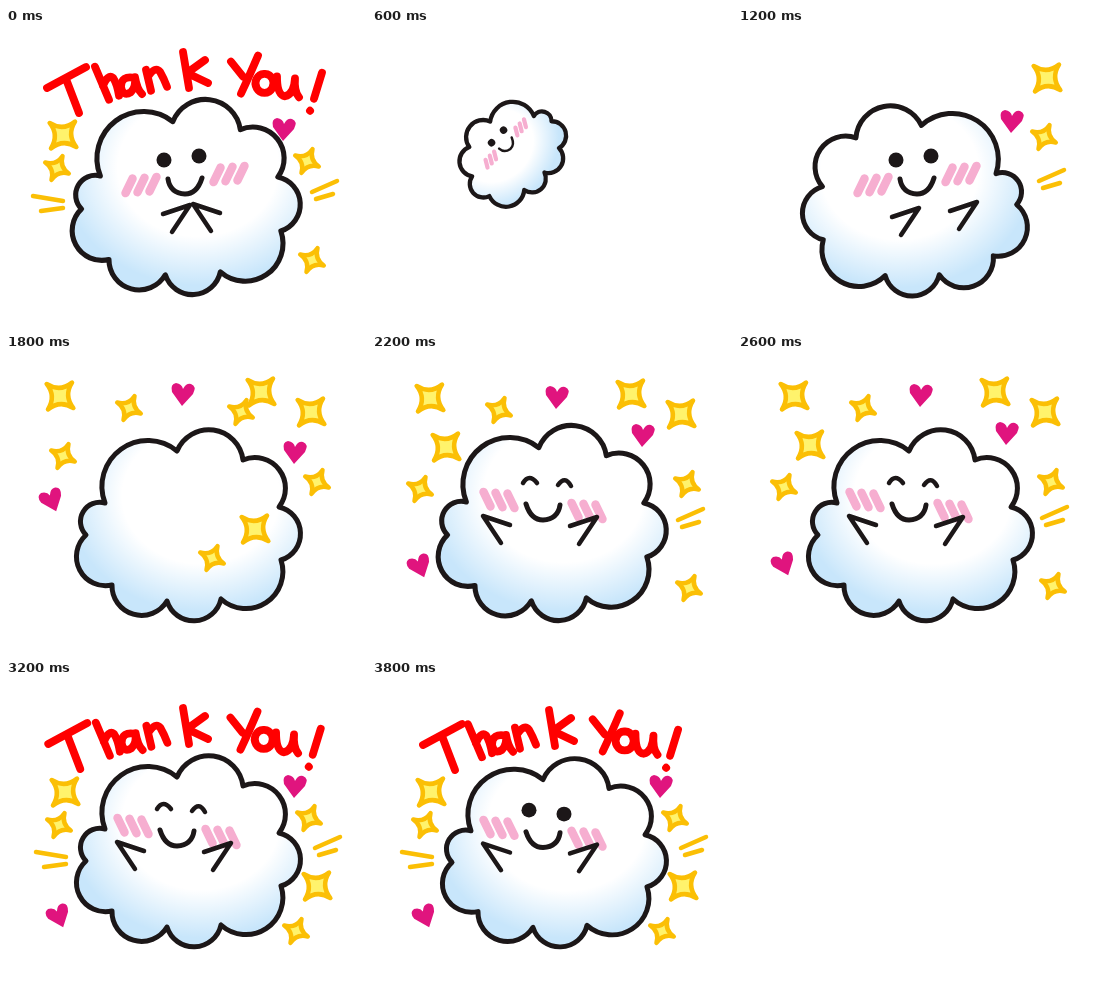
Recreate the animation shown at these times as an HTML page with a canvas. Size 360 by 298 pixels, loop 4 s.

```html
<!DOCTYPE html>
<html lang="en">
<head>
<meta charset="utf-8">
<title>Thank You!</title>
<style>
html, body { margin: 0; width: 100%; height: 100%; overflow: hidden; background: #fff; }
canvas { display: block; }
</style>
</head>
<body>
<canvas id="stage" width="360" height="298" role="img" aria-label="Thank You!"></canvas>
<script>
const ctx = document.getElementById('stage').getContext('2d');
const INK = '#1c1718', RED = '#ff0000', GOLD = '#fbbf05', LEMON = '#fff36c', PINK = '#e0147e', BLUSH = '#f6aed0';
const STEP = 200, STEPS = 20;
const rad = deg => deg * Math.PI / 180;

// The cloud is a ring of notches joined by bumps whose radius follows their width.
const notches = [[99, 149], [171, 97], [237, 106], [273, 153], [275, 206], [215, 245], [161, 247], [106, 231], [80, 181]];
const outline = new Path2D(notches.reduce((d, [x, y], i) => {
  const [nx, ny] = notches[(i + 1) % notches.length];
  const r = Math.hypot(nx - x, ny - y) * .517;
  return d + `A${r} ${r} 0 0 1 ${nx} ${ny}`;
}, `M${notches[0]}`) + 'Z');

const smile = new Path2D('M154 150Q159 166 171 166Q186 165 188 151');
const lids = new Path2D('M151 129Q157 119 165 129M186 131Q193 121 199 132');
const hook = new Path2D('M-14 5L13 -4L-5 23');
const heart = new Path2D('M-1 12L-11 -2Q-13 -10 -7 -11Q-1 -10 0 -5Q3 -11 8 -10Q14 -8 10 0Z');
const leftRays = new Path2D('M-15 -6L15 -1M-7 9L15 6');
const rightRays = new Path2D('M-13 6L12 -5M-9 13L8 8');

// Letters by their distance from the middle of the words
const letters = [
  [-125, 'M-20 -3L19 -24M-1 -12L12 22'],
  [-87, 'M-10 -14L4 19M-2 5Q3 -7 8 -3Q12 3 14 15'],
  [-63, 'M6 2Q-8 -1 -8 11Q-6 21 2 16Q7 11 6 1Q8 13 13 18'],
  [-37, 'M-9 -3L-4 18M-7 4Q0 -7 5 -1Q9 6 12 14'],
  [0, 'M-9 -19L-3 17M13 -11L-5 2L16 12'],
  [53, 'M-14 -13L-2 2M13 -19Q4 2 -4 19'],
  [73, 'M0 -4A9 9.5 0 1 1 -1 -4Z'],
  [94, 'M-9 -6Q-9 13 -1 14Q8 12 9 -4Q8 9 13 15'],
  [124, 'M6 -18L-2 8M-6 20l.1 .1']
].map(([x, d]) => [x, new Path2D(d)]);

function at(x, y, paint, { angle = 0, scale = 1, flip = 1 } = {}) {
  ctx.save();
  ctx.translate(x, y);
  ctx.rotate(rad(angle));
  ctx.scale(scale * flip, scale);
  paint();
  ctx.restore();
}

function line(path, color, width) {
  ctx.strokeStyle = color;
  ctx.lineWidth = width;
  ctx.stroke(path);
}

function dot(x, y, r) {
  ctx.beginPath();
  ctx.arc(x, y, r, 0, 7);
  ctx.fill();
}

function drawBody(width) {
  ctx.translate(-183.5, -175);
  ctx.save();
  ctx.clip(outline);
  ctx.fillStyle = '#c8e6fb';
  ctx.fillRect(50, 60, 270, 220);
  ctx.translate(195, 142);
  ctx.scale(1.16, 1);
  const glow = ctx.createRadialGradient(0, 0, 68, 0, 0, 116);
  glow.addColorStop(0, '#fff');
  glow.addColorStop(1, 'rgba(255,255,255,0)');
  ctx.fillStyle = glow;
  ctx.fillRect(-150, -90, 300, 240);
  ctx.restore();
  line(outline, INK, width);
}

function drawCheek(x, y) {
  at(x, y, () => {
    ctx.beginPath();
    for (const dx of [-13, -1, 11]) {
      ctx.moveTo(dx - 3, -7);
      ctx.lineTo(dx + 5, 7);
    }
    ctx.strokeStyle = BLUSH;
    ctx.lineWidth = 8.5;
    ctx.stroke();
  }, { angle: 4 });
}

// Faces mirror around x = 175 when the cloud looks the other way.
function drawFace({ happy, flip }) {
  at(175, 0, () => {
    ctx.translate(-175, 0);
    drawCheek(127, 146);
    drawCheek(215, 157);
    line(smile, INK, 5);
    if (happy) return line(lids, INK, 4.5);
    ctx.fillStyle = INK;
    dot(157, 128, 7.5);
    dot(192, 132, 7.5);
  }, { flip });
}

function drawStar([x, y, big]) {
  const r = big ? 18 : 13;
  at(x, y, () => {
    ctx.beginPath();
    ctx.moveTo(r, 0);
    for (let i = 1; i <= 4; i++) {
      const mid = rad(i * 90 - 45), end = rad(i * 90);
      ctx.quadraticCurveTo(Math.cos(mid) * r * .2, Math.sin(mid) * r * .2, Math.cos(end) * r, Math.sin(end) * r);
    }
    ctx.closePath();
    ctx.fillStyle = LEMON;
    ctx.fill();
    line2(GOLD, 4.5);
  }, { angle: big ? 42 : 25 });
}

function line2(color, width) {
  ctx.strokeStyle = color;
  ctx.lineWidth = width;
  ctx.stroke();
}

function drawHeart([x, y]) {
  at(x, y, () => {
    ctx.fillStyle = PINK;
    ctx.fill(heart);
  }, { angle: x < 100 ? -25 : 0 });
}

function drawBits({ stars, hearts, rays = [] }) {
  stars.forEach(drawStar);
  hearts.forEach(drawHeart);
  for (const [x, y] of rays) at(x, y, () => line(x < 180 ? leftRays : rightRays, GOLD, 4.5));
}

// The words sit on an arch that drops towards both ends.
function drawWords({ top, drop, spread }) {
  for (const [dx, path] of letters) {
    at(186 + dx * spread, top + drop * (dx / 125) ** 2, () => line(path, RED, 7.8));
  }
}

const move = (points, dx, dy) => points.map(([x, y, big]) => [x + dx, y + dy, big]);
const shift = ({ stars, hearts, rays = [] }, dx, dy) =>
  ({ stars: move(stars, dx, dy), hearts: move(hearts, dx, dy), rays: move(rays, dx, dy) });

const arch = [[56, 42, 1], [125, 54], [257, 38, 1], [307, 58, 1], [313, 128]];
const sides = [[59, 112, 1], [53, 145], [303, 138]];
const sideRays = [[45, 178], [322, 162]];

const bowBits = { stars: [...move(sides, -2, -5), [306, 232]], hearts: [[278, 101]], rays: move(sideRays, -3, -4) };
const flyBits = { stars: [[309, 50, 1], [306, 109]], hearts: [[274, 93]], rays: [[314, 147]] };
const swingBits = shift({ ...flyBits, stars: [...flyBits.stars, [302, 236]] }, -1, 4);
const turnBits = { stars: [...arch.slice(2), [235, 60]], hearts: [[177, 43], [289, 99]] };
const burstBits = {
  stars: [...move(arch, -2, 0), [57, 102], [235, 58], [249, 175, 1], [206, 204]],
  hearts: [[177, 40], [289, 98], [46, 146]]
};
const partyBits = {
  stars: [...arch, [72, 91, 1], [46, 133], [315, 232]],
  hearts: [[183, 41], [269, 79], [46, 210]],
  rays: [[317, 158]]
};
const thanksBits = {
  stars: [...sides, [311, 206, 1], [290, 251]],
  hearts: [[289, 106], [53, 236]],
  rays: sideRays
};

const words = {
  high: { top: 43, drop: 20, spread: 1 },
  wide: { top: 47, drop: 20, spread: .99 },
  tight: { top: 49, drop: 19, spread: .92 }
};

// Bodies: [x, y, transform]
const bodies = {
  plain: [183.5, 175, {}],
  bow: [181, 173, { scale: 1.02, angle: -1 }],
  mirrored: [175, 176, { flip: -1, angle: -3 }]
};

// Arms: one hook each, [x, y, flip]
const arms = {
  pray: [[171, 181, 1], [200, 180, -1]],
  out: [[168, 184, 1], [226, 178, 1]],
  up: [[124, 166, -1], [212, 167, 1]]
};

const looking = { flip: -1 }, smiling = { happy: true };
const flight = [[108, 86], [140, 126], [190, 172], [190, 145]].map(([x, y], i) => ({
  body: bodies.mirrored, face: looking, x, y, scale: .165 * (i + 2), angle: 10 * (i - 5)
}));
const mirrored = (bits, limbs = arms.out) => ({ body: bodies.mirrored, face: looking, arms: limbs, bits });
const cheer = (bits, text) => ({ body: bodies.plain, face: smiling, arms: arms.up, bits, text });
const happyThanks = cheer(thanksBits, words.wide);
const openThanks = { ...cheer(thanksBits, words.tight), face: {}, squash: .985 };

const scenes = [
  { body: bodies.bow, face: looking, arms: arms.pray, bits: bowBits, text: words.high },
  {},
  ...flight,
  mirrored(flyBits),
  mirrored(swingBits, move(arms.out, -6, 3).map(([x, y]) => [x, y, 1])),
  { body: bodies.plain, bits: turnBits },
  { body: bodies.plain, bits: burstBits },
  mirrored(shift(partyBits, -3, 3)),
  { ...cheer(shift(partyBits, 2, 2)), body: bodies.bow },
  cheer(shift(partyBits, -2, 3)),
  cheer(partyBits),
  cheer(thanksBits, words.high),
  openThanks, happyThanks, openThanks, happyThanks, openThanks
];

function drawCharacter({ body, face, arms: limbs = [], x = 175, y = 176, scale = 1, angle = 0 }) {
  at(x, y, () => {
    ctx.translate(-175, -176);
    const [bx, by, turn] = body;
    at(bx, by, () => drawBody((3.6 + 1.4 * scale) / scale), turn);
    if (face) drawFace(face);
    for (const [hx, hy, flip] of limbs) at(hx, hy, () => line(hook, INK, 4.5), { flip });
  }, { scale, angle });
}

function drawScene(scene) {
  ctx.fillStyle = '#fff';
  ctx.fillRect(0, 0, 360, 298);
  ctx.lineCap = ctx.lineJoin = 'round';
  if (scene.body) {
    const { squash = 1 } = scene;
    ctx.save();
    ctx.translate(0, 270 * (1 - squash));
    ctx.scale(1, squash);
    drawCharacter(scene);
    ctx.restore();
  }
  if (scene.bits) drawBits(scene.bits);
  if (scene.text) drawWords(scene.text);
}

let shown = -1;
function tick() {
  const step = Math.floor(performance.now() / STEP) % STEPS;
  if (step !== shown) drawScene(scenes[shown = step]);
  requestAnimationFrame(tick);
}
tick();
</script>
</body>
</html>
```
